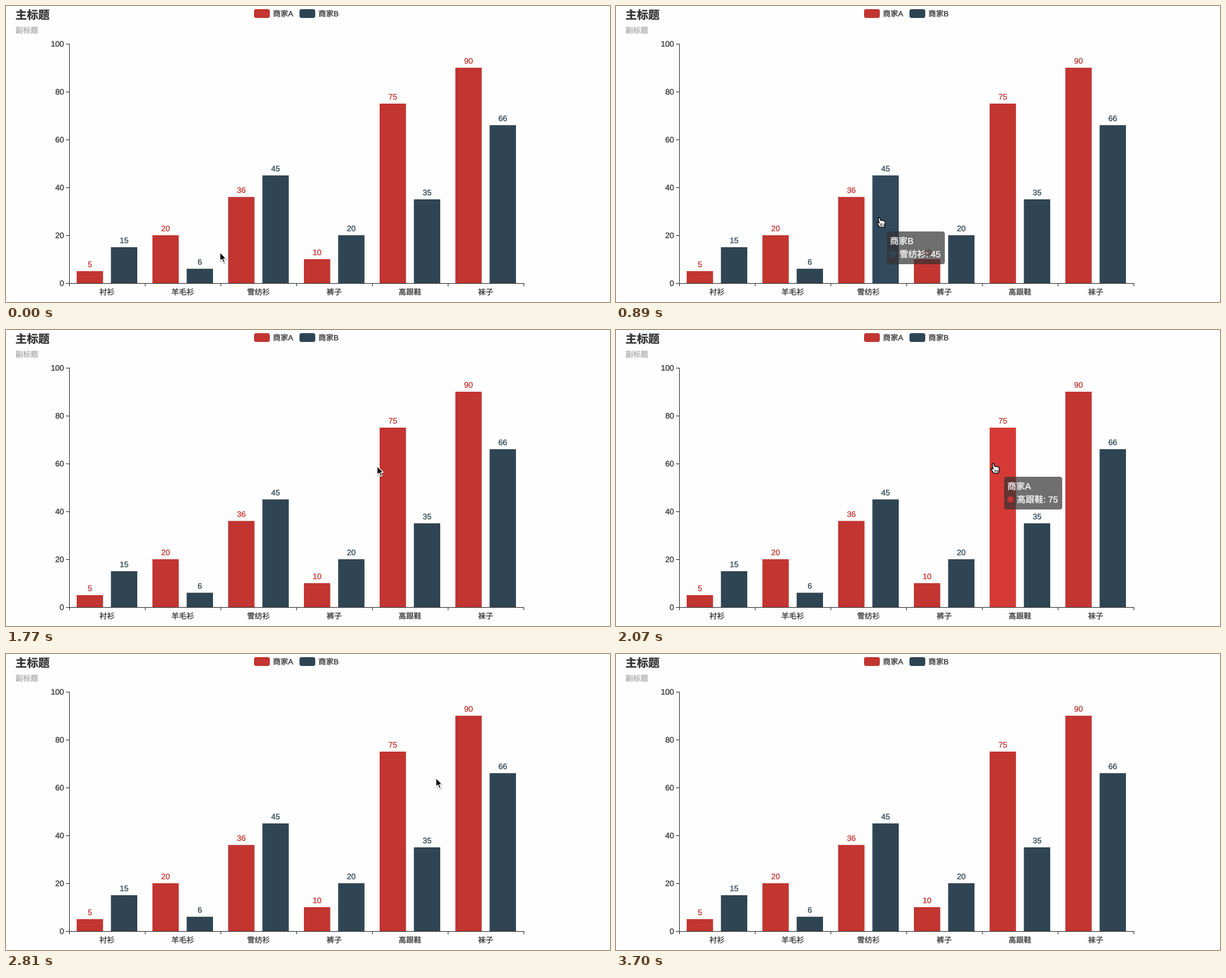
A matplotlib script for the animation above (4.03 s loop, 957 px wide and 470 px high).

```python
import numpy as np
import matplotlib
import matplotlib.pyplot as plt
from matplotlib.animation import FuncAnimation
from matplotlib.patches import Circle, FancyBboxPatch, Polygon, Rectangle
from matplotlib.patheffects import Stroke

matplotlib.rcParams["font.family"] = ["Liberation Sans", "Noto Sans CJK JP"]
matplotlib.rcParams["toolbar"] = "None"

W, H, DPI = 957, 470, 100
PX = 72 / DPI
LOOP, FRAMES = 4030, 130
INTERVAL = LOOP // FRAMES
STEP, LAST_STEP = 147.5, 25   # ms between picture changes, final change
PAGE_LAG = 0.5                # steps by which the page trails the pointer

INK = "#333333"
CATEGORIES = ["衬衫", "羊毛衫", "雪纺衫", "裤子", "高跟鞋", "袜子"]
SERIES = [
    ("商家A", "#c23531", "#d53a36", [5, 20, 36, 10, 75, 90]),
    ("商家B", "#2f4554", "#32495c", [15, 6, 45, 20, 35, 66]),
]
LEFT, BASE, SLOT, UNIT = 100, 440, 120, 3.8
BAR_W = 0.8 * SLOT / 2.3      # two bars and a gap of 0.3 bar in 80% of a slot

# pointer stops: step, x, y
STOPS = [(0, 339, 391), (3, 379, 347), (8, 439, 329), (12, 588, 216),
         (16, 609, 207), (21.5, 736, 189), (22, 759, 214), (24, 898, 460),
         (25, 990, 640)]

ARROW = np.array([(0, 0), (0, 14), (3.2, 11), (5.6, 16.6), (8, 15.6),
                  (5.7, 10.2), (10, 10.2)])
HAND = np.array([(-2.6, 1.2), (-0.4, 0.4), (1.6, 5.2), (6, 5.4), (8.6, 7),
                 (8.6, 11), (7.2, 16), (0, 16), (-4.6, 9), (-3.4, 8),
                 (-0.8, 9.6)])

fig = plt.figure(figsize=(W / DPI, H / DPI), dpi=DPI, facecolor="#fefefe")
ax = fig.add_axes([0, 0, 1, 1])
ax.set_xlim(0, W)
ax.set_ylim(H, 0)
ax.axis("off")


def label(x, cy, text, size=12, color=INK, ha="left", z=4, **kw):
    """Slightly thickened text whose line box is centred on cy."""
    weight = Stroke(linewidth=0.3 * PX, foreground=color)
    return ax.text(x, cy + 0.36 * size, text, fontsize=size * PX, color=color,
                   ha=ha, va="baseline", zorder=z, path_effects=[weight], **kw)


def number(x, cy, value, **kw):
    return label(x, cy, str(value), size=12.5, **kw)


def line(x0, y0, x1, y1):
    """One-pixel line through pixel centres."""
    ax.plot([x0 + 0.5, x1 + 0.5], [y0 + 0.5, y1 + 0.5], color=INK, lw=PX,
            zorder=3, solid_capstyle="projecting", snap=False)


def round_box(x, y, w, h, r, color, z=2, alpha=1):
    style = f"round,pad=0,rounding_size={r}"
    return ax.add_patch(FancyBboxPatch((x, y), w, h, boxstyle=style, lw=0,
                                       fc=color, alpha=alpha, zorder=z))


label(15, 14, "主标题", 18, weight="bold")
label(15, 38.5, "副标题", color="#aaaaaa")
for i, (name, color, _, _) in enumerate(SERIES):
    round_box(393 + 72 * i, 5, 25, 14, 3.5, color)
    label(423 + 72 * i, 12, name)

line(LEFT, BASE - 100 * UNIT, LEFT, BASE)
line(LEFT, BASE, LEFT + SLOT * len(CATEGORIES), BASE)
for value in range(0, 101, 20):
    y = BASE - UNIT * value
    line(LEFT - 5, y, LEFT, y)
    number(92, y, value, ha="right")
for i in range(len(CATEGORIES) + 1):
    line(LEFT + SLOT * i, BASE, LEFT + SLOT * i, BASE + 4)
for i, name in enumerate(CATEGORIES):
    label(LEFT + SLOT * (i + 0.5), 454, name, ha="center")

bars = []
for s, (_, color, _, values) in enumerate(SERIES):
    for c, value in enumerate(values):
        x = LEFT + SLOT * (c + 0.1) + 1.3 * BAR_W * s
        top = BASE - UNIT * value
        patch = ax.add_patch(Rectangle((x, top), BAR_W, BASE - top, fc=color,
                                       lw=0, zorder=2, snap=False))
        number(x + BAR_W / 2, top - 11, value, color=color, ha="center")
        bars.append((patch, s, c))

tip_box = round_box(0, 0, 92, 52, 4, "#323232", z=6, alpha=0.7)
tip_dot = ax.add_patch(Circle((0, 0), 5, lw=0, zorder=7))
tip_title, tip_text = (label(0, 0, "", 14, "white", z=7) for _ in range(2))

arrow_shadow = ax.add_patch(Polygon(ARROW, fc="black", ec="black", lw=1.6,
                                    alpha=0.15, zorder=8))
arrow = ax.add_patch(Polygon(ARROW, fc="black", ec="white", lw=0.9, zorder=9))
hand = ax.add_patch(Polygon(HAND, fc="white", ec="black", lw=0.9, zorder=9,
                            joinstyle="round"))
knuckles = [ax.plot([], [], color="black", lw=0.6, zorder=10)[0]
            for _ in range(3)]
hover_parts = [tip_box, tip_dot, tip_title, tip_text, hand, *knuckles]


def pointer(step):
    """Position at a step, easing in and out between stops."""
    for (t0, *a), (t1, *b) in zip(STOPS, STOPS[1:]):
        if step <= t1:
            break
    u = np.clip((step - t0) / (t1 - t0), 0, 1)
    return np.array(a) + (np.array(b) - a) * u * u * (3 - 2 * u)


def bar_at(x, y):
    for bar in bars:
        left, top = bar[0].get_xy()
        if left <= x <= left + BAR_W and top <= y <= BASE:
            return bar
    return None


def place(text, x, cy, string):
    text.set_text(string)
    text.set_position((x, cy + 0.36 * 14))


def show_tooltip(x, y, s, c):
    name, color, _, values = SERIES[s]
    tip_box.set_bounds(x, y, 50 + 14 * len(CATEGORIES[c]), 52)
    tip_dot.set_center((x + 10, y + 36))
    tip_dot.set_facecolor(color)
    place(tip_title, x + 5, y + 15, name)
    place(tip_text, x + 20, y + 36, f"{CATEGORIES[c]}: {values[c]}")


def update(frame):
    step = min(LAST_STEP, int(((frame + 1) * INTERVAL - 1) / STEP))
    mouse, seen = pointer(step), pointer(step - PAGE_LAG)
    hit = bar_at(*seen)

    for bar in bars:
        _, color, bright, _ = SERIES[bar[1]]
        bar[0].set_facecolor(bright if bar is hit else color)
    for part in hover_parts:
        part.set_visible(hit is not None)
    for part in (arrow, arrow_shadow):
        part.set_visible(hit is None)

    if hit:
        show_tooltip(*np.round(seen + 20), *hit[1:])
        hand.set_xy(HAND + mouse)
        for i, stroke in enumerate(knuckles):
            x, y = mouse + (1.4 + 2.2 * i, 10)
            stroke.set_data([x, x], [y, y + 3.4])
    else:
        arrow.set_xy(ARROW + mouse)
        arrow_shadow.set_xy(ARROW + mouse + (0.5, 1.5))
    return []


anim = FuncAnimation(fig, update, frames=FRAMES, interval=INTERVAL,
                     repeat=True, repeat_delay=0, blit=False)
plt.show()
```
